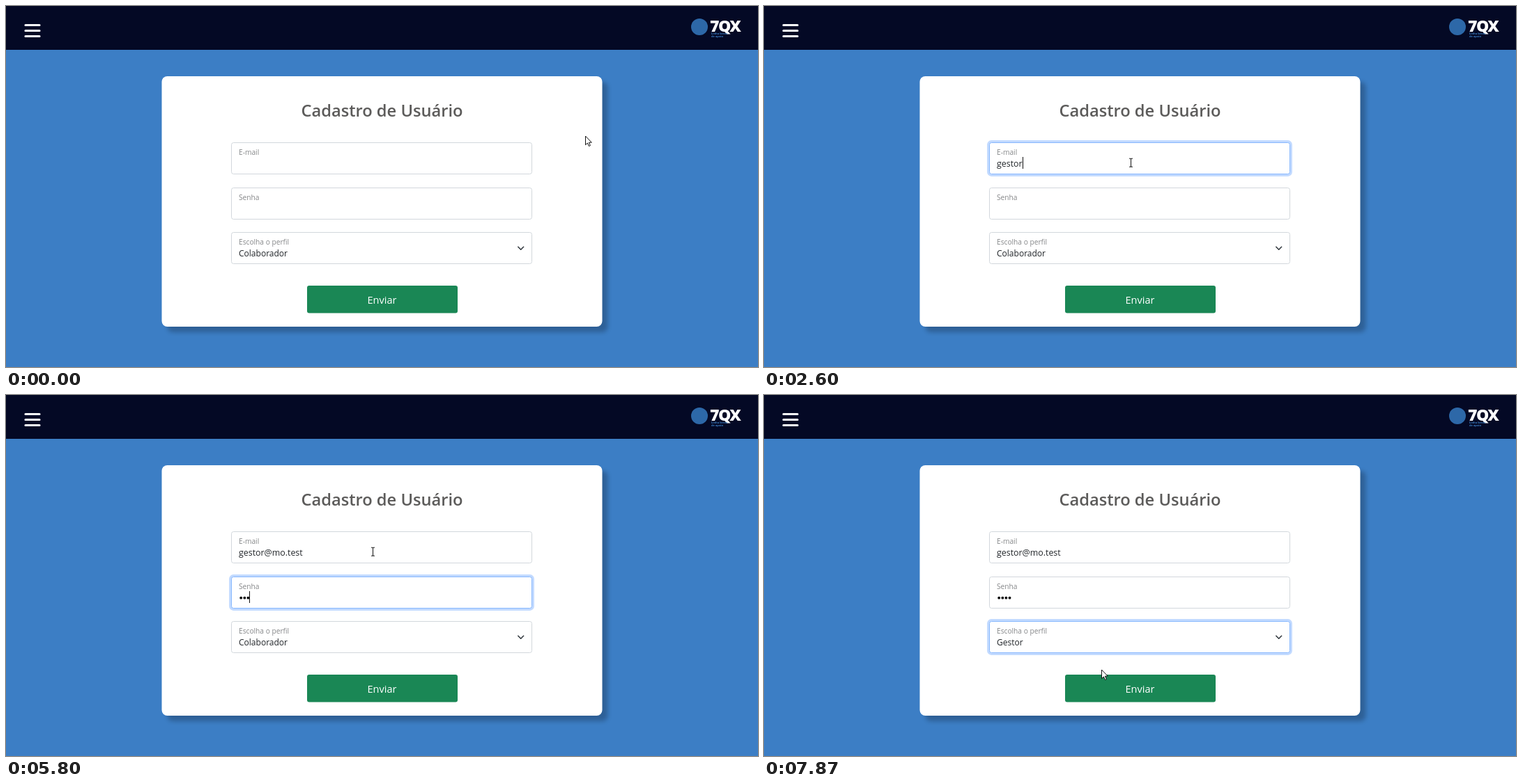
An HTML page that plays this animation: 1079x519 px, repeating every 8 s.

```html
<!DOCTYPE html>
<html lang="pt-BR">
<head>
<meta charset="utf-8">
<title>Cadastro de Usuário</title>
<style>
  html, body { margin: 0; width: 100%; height: 100%; overflow: hidden; background: #3c7ec5; }
  svg { display: block; width: 100%; height: 100%; }
  text { font-family: "Open Sans", "Noto Sans", sans-serif; font-size: 12px; fill: #212529; white-space: pre; }
  .title { font-size: 23.7px; font-weight: 600; fill: #5c5b5a; text-anchor: middle; }
  .label { font-size: 10.2px; fill: #858789; }
  .email { font-size: 12.4px; }
  .button { font-size: 14.5px; fill: #fff; text-anchor: middle; }
  .option { fill: #5c5c5c; }
  .brand { font-size: 26px; font-weight: 800; fill: #fff; letter-spacing: -1.5px; }
  .tiny { font-size: 4px; font-weight: 700; fill: #3c7ec5; }
  .ring { fill: rgb(13, 110, 253); }
  .box { fill: #fff; }
  .caret { fill: #111; }
</style>
</head>
<body>
<svg id="stage" viewBox="0 0 1079 519">
  <rect width="1079" height="519" fill="#3c7ec5"/>
  <rect width="1079" height="63" fill="#040925"/>
  <path d="M28 27.5H48M28 35.5H48M28 43.5H48" stroke="#fff" stroke-width="3.2" stroke-linecap="round"/>

  <circle cx="995" cy="30" r="12" fill="#2d68a8"/>
  <text class="brand" x="1010" y="37" style="font-size:23px">7QX</text>
  <text class="tiny" x="1012" y="41">Linha breve</text>
  <text class="tiny" x="1012" y="44.5">de apoio</text>

  <rect x="231.5" y="109" width="632" height="360" rx="8" fill="#000" opacity=".23" style="filter:blur(3px)"/>
  <rect x="223.5" y="101" width="632" height="360" rx="8" fill="#fff"/>
  <text class="title" x="539.5" y="159">Cadastro de Usuário</text>

  <rect x="432" y="402" width="216" height="39.5" rx="3" fill="#1a8755"/>
  <text class="button" x="539.5" y="428">Enviar</text>

  <g id="fields"></g>
  <path d="M734.8 346.3L738.7 350.2 742.6 346.3" fill="none" stroke="#343a40" stroke-width="1.6" stroke-linecap="round" stroke-linejoin="round"/>

  <g id="menu">
    <rect x="324" y="373" width="432" height="54" fill="#000" opacity=".4" style="filter:blur(2px)"/>
    <rect x="323.5" y="371.5" width="431" height="53" fill="#fff" stroke="#767676"/>
    <rect id="hot" x="324" width="430" height="17.6" fill="#1e90ff"/>
  </g>

  <path id="arrow" d="M.5 .5V13.2L3.4 10.5 5.4 15 7.4 14.1 5.4 9.7H9.3Z" fill="#fff" stroke="#111" stroke-width="1" stroke-linejoin="round"/>
  <path id="beam" d="M-2.5 -6H-.7L0 -5.4 .7 -6H2.5M0 -5.4V5.4M-2.5 6H-.7L0 5.4 .7 6H2.5" fill="none" stroke="#222" stroke-width="1.1"/>
</svg>
<script>
const LOOP = 8000;
const EMAIL = "gestor@mo.test";
const EMAIL_KEYS = [1930, 2000, 2130, 2330, 2470, 2600, 3000, 3470, 3800, 4000, 4200, 4330, 4470, 4530];
const PASS_KEYS = [5470, 5600, 5800, 6070];
const OPTIONS = ["Colaborador", "Gestor", "Administrador"];
const MENU_OPEN = 7000, MENU_CLOSE = 7870;
const FADE = 150;

// time, x, y of the pointer
const PATH = [
  [0, 831, 187], [70, 824, 189], [200, 758, 208], [330, 672, 236],
  [400, 622, 242.5], [470, 570, 238], [600, 526, 225],
  [6330, 526, 225], [6470, 522, 246], [6600, 514, 288], [6800, 505, 339],
  [6930, 503, 342], [7070, 497, 354], [7200, 487, 374], [7400, 481, 388],
  [7530, 483, 394], [7670, 483, 394], [7730, 484, 395], [8000, 484, 395]
];

const $ = id => document.getElementById(id);

function add(parent, tag, attrs, text = "") {
  const el = document.createElementNS("http://www.w3.org/2000/svg", tag);
  set(el, attrs);
  el.textContent = text;
  return parent.appendChild(el);
}

function set(el, attrs) {
  for (const key in attrs) el.setAttribute(key, attrs[key]);
}

const show = (el, on) => set(el, { visibility: on ? "visible" : "hidden" });
const within = (t, ...spans) => spans.some(([a, b]) => t >= a && t < b);
const mix = (a, b, p) => a + (b - a) * p;

function ease(t, start) {
  const p = Math.min(1, Math.max(0, (t - start) / FADE));
  return p * p * (3 - 2 * p);
}

function makeField(y, label, focusAt, blurAt) {
  const g = $("fields");
  const ring = add(g, "rect", { class: "ring" });
  const box = add(g, "rect", { class: "box", x: 323.5, y: y + .5, width: 431, height: 45, rx: 3 });
  add(g, "text", { class: "label", x: 334, y: y + 18 }, label);
  return { y, ring, box, focusAt, blurAt };
}

function drawFocus(field, t) {
  const p = ease(t, field.focusAt) - ease(t, field.blurAt);
  const s = 2.9 * p;
  set(field.ring, {
    x: 323 - s, y: field.y - s, width: 432 + 2 * s, height: 46 + 2 * s,
    rx: 3.2 + s, "fill-opacity": .25 * p
  });
  const rgb = [[210, 134], [215, 183], [220, 254]].map(([a, b]) => Math.round(mix(a, b, p)));
  set(field.box, { stroke: `rgb(${rgb})` });
}

const fields = [
  makeField(196, "E-mail", 1050, 4790),
  makeField(261, "Senha", 4790, 6915),
  makeField(325, "Escolha o perfil", 6915, Infinity)
];
const layer = $("fields");
const email = add(layer, "text", { class: "email", x: 334, y: 230.5 });
const dots = PASS_KEYS.map((_, i) => add(layer, "circle", { cx: 337.2 + 5.1 * i, cy: 291.7, r: 1.9 }));
const profile = add(layer, "text", { x: 334, y: 359.5 });
const emailCaret = add(layer, "rect", { class: "caret", y: 217, width: 1, height: 17 });
const passCaret = add(layer, "rect", { class: "caret", y: 282, width: 1, height: 17 });
const options = OPTIONS.map((name, i) =>
  add($("menu"), "text", { class: "option", x: 334, y: 385.2 + 17.6 * i }, name));

function pointerAt(t) {
  const i = Math.max(1, PATH.findIndex(k => k[0] >= t));
  const [t0, x0, y0] = PATH[i - 1], [t1, x1, y1] = PATH[i];
  const p = (t - t0) / (t1 - t0);
  return [mix(x0, x1, p), mix(y0, y1, p)];
}

function draw(t) {
  fields.forEach(f => drawFocus(f, t));

  const typed = EMAIL_KEYS.filter(k => k <= t).length;
  email.textContent = EMAIL.slice(0, typed);
  const width = typed ? email.getComputedTextLength() : 0;
  set(emailCaret, { x: Math.round(334 + width) });
  show(emailCaret, within(t, [1070, 1600], [1930, 4790]));

  dots.forEach((d, i) => show(d, t >= PASS_KEYS[i]));
  const count = PASS_KEYS.filter(k => k <= t).length;
  set(passCaret, { x: Math.round(334 + 5.1 * count) });
  show(passCaret, within(t, [4790, 5330], [5470, 6600]));

  const [x, y] = pointerAt(t);
  const hot = y > 389.5 ? 1 : 0;
  $("menu").style.display = within(t, [MENU_OPEN, MENU_CLOSE]) ? "" : "none";
  set($("hot"), { y: 372 + 17.6 * hot });
  options.forEach((o, i) => { o.style.fill = i === hot ? "#fff" : ""; });
  profile.textContent = OPTIONS[t >= MENU_CLOSE ? 1 : 0];

  const typing = x > 323 && x < 755 && within(y, [196, 242], [261, 307]);
  show($("beam"), typing);
  show($("arrow"), !typing);
  set($("beam"), { transform: `translate(${x + .5} ${y + .2})` });
  set($("arrow"), { transform: `translate(${x} ${y - .5})` });
}

// The screen refreshes 15 times a second
const snap = t => Math.round(Math.floor((t + 3.4) * .015) * 20 / 3) * 10 % LOOP;

const start = performance.now();
function frame() {
  draw(snap((performance.now() - start) % LOOP));
  requestAnimationFrame(frame);
}
frame();
</script>
</body>
</html>
```
